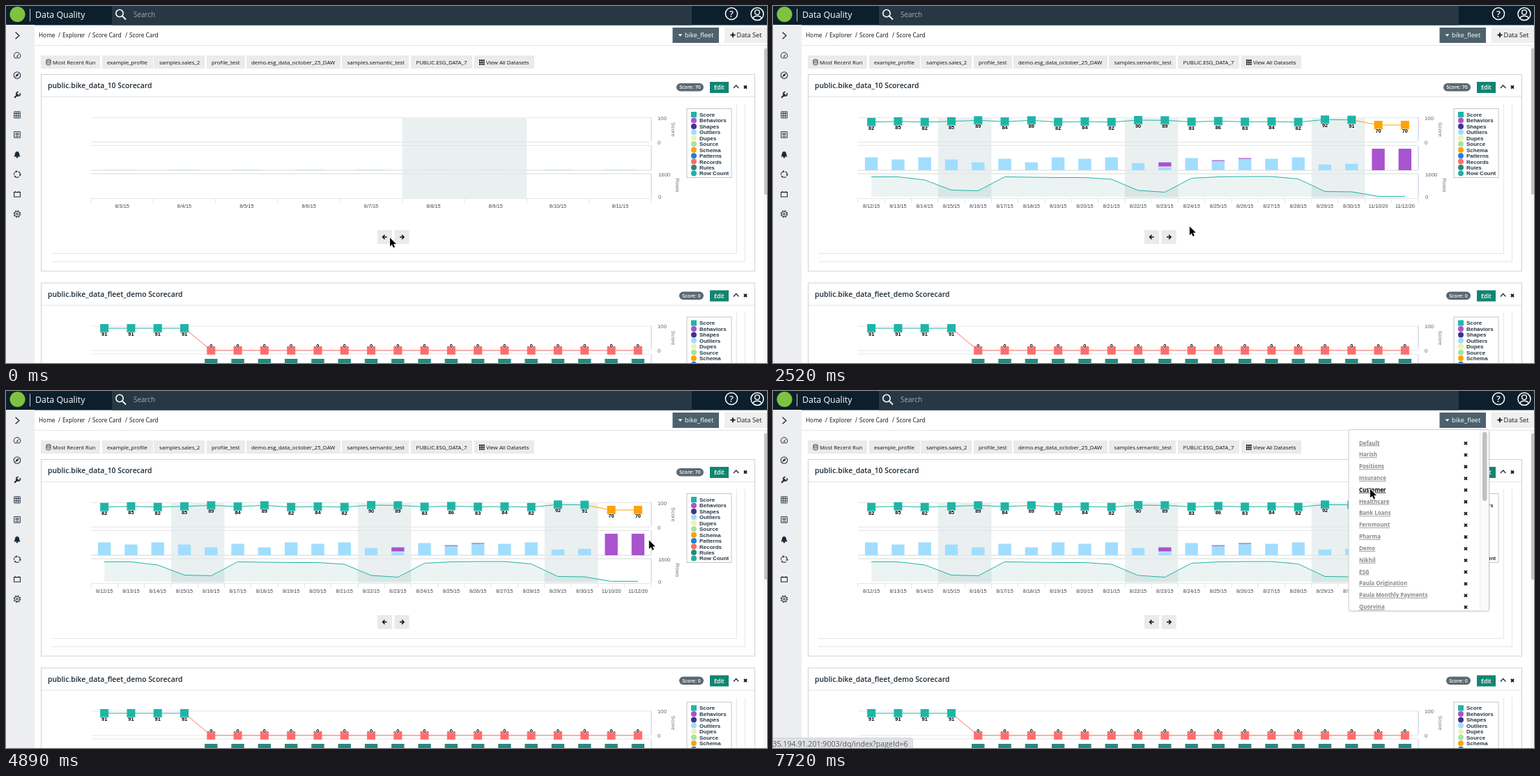
Recreate the animation shown at these times as an HTML page. Size 1092 px wide and 513 px high, loop 8000 ms.

```html
<!DOCTYPE html>
<html lang="en">
<head>
<meta charset="utf-8">
<title>Scorecards</title>
<style>
  html, body { margin: 0; width: 100%; height: 100%; overflow: hidden; background: #fff; }
  svg { display: block; width: 100%; height: 100%; }
  text { font-family: "Open Sans", "Noto Sans", sans-serif; white-space: pre; }
  .chart { font-family: "Liberation Sans", Arial, sans-serif; }
  .value { font-weight: bold; paint-order: stroke; stroke: #fff; stroke-width: 1.4px; stroke-linejoin: round; }
</style>
</head>
<body>
<svg id="stage" viewBox="0 0 1092 513">
  <g id="page"></g>
  <g id="live"></g>
</svg>
<script>
const LOOP = 8000, STEP = 147.85, LAST = 52;
const LEFT = 122, WIDTH = 804;
const TEAL = '#1fb5a6', SKY = '#a1ddff', PURPLE = '#a953cf', ORANGE = '#ffa205', RED = '#ff6d6b', RULES = '#26897f';
const NAVY = '#16293a';

// --- drawing helpers ---
const rect = (x, y, w, h, fill, more = '') =>
  `<rect x="${x}" y="${y}" width="${w}" height="${h}" fill="${fill}" ${more}/>`;
const line = (x1, y1, x2, y2, color, w = 1) =>
  `<path d="M${x1} ${y1}L${x2} ${y2}" stroke="${color}" stroke-width="${w}"/>`;
const path = (d, color, w = 1.2, fill = 'none', more = '') =>
  `<path d="${d}" stroke="${color}" stroke-width="${w}" fill="${fill}" ${more}/>`;
const circle = (x, y, r, fill, more = '') =>
  `<circle cx="${x}" cy="${y}" r="${r}" fill="${fill}" ${more}/>`;
const text = (x, y, str, size, fill = '#1b1b1b', more = '') =>
  `<text x="${x}" y="${y}" font-size="${size}" fill="${fill}" ${more}>${str}</text>`;
const at = (x, y, body, scale = 1) => `<g transform="translate(${x} ${y}) scale(${scale})">${body}</g>`;
const cross = (x, y) => path(`M${x - 2} ${y - 2}l4 4m0 -4l-4 4`, '#111', 1.8);
const clamp = v => Math.max(0, Math.min(1, v));
const MID = 'text-anchor="middle"', SEMI = 'font-weight="600"', BOLD = 'font-weight="bold"';

// --- chart data ---
const pages = [
  { start: -87, scale: 1.78, weekends: [5],
    scores: [89, 84, 84, 84, 84, 93, 92.7, 84, 84],
    rows: [248, 246.5, 247, 248, 250, 265, 266.5, 246.5, 245.5],
    extra: { 6: .8 },
    date: i => `8/${3 + i}/15` },
  { start: 1337, scale: 1.03, weekends: [3, 10, 17],
    scores: [82, 85, 82, 85, 89, 84, 89, 82, 84, 82, 90, 89, 83, 86, 83, 84, 82, 92, 91, 70, 70],
    rows: [245.5, 245.5, 250, 264.5, 265.5, 245.5, 246, 246.5, 246.5, 249, 265, 267.5, 247.5, 245.5,
      245, 245, 248.5, 266.5, 267, 273.5, 273.5],
    extra: { 11: 6.5, 13: 1.2, 14: 1.2, 19: 32, 20: 32 },
    date: i => i < 19 ? `8/${12 + i}/15` : `11/${i * 2 - 28}/20` }
];
const tone = s => s > 75 ? TEAL : s > 50 ? ORANGE : RED;
const points = (scores, dy = 0) => scores.map((s, i) => ({
  x: LEFT + (i + .5) * WIDTH / scores.length, y: 195.5 + dy - .35 * s, s, color: tone(s)
}));

const scoreLine = (pts, w) => pts.slice(1).map((p, i) =>
  line(pts[i].x, pts[i].y, p.x, p.y, p.color, w)).join('');
const markers = pts => pts.map(p => rect(p.x - 6, p.y - 6, 12, 12, p.color)).join('');
const values = pts => pts.map(p =>
  text(p.x, p.y + (p.s ? 11.1 : -3.7), Math.round(p.s), 7.4, '#000', `class="chart value" ${MID}`)).join('');

// --- still parts ---
function sidebar() {
  const icons = [
    path('M-2.5 -5L3 0L-2.5 5', NAVY, 1.4),
    path('M-3.6 4A5 5 0 1 1 3.6 4ZM0 1.5L2.6 -2', NAVY, 1) + circle(0, 1.5, 1, NAVY),
    circle(0, 0, 5, 'none', `stroke="${NAVY}" stroke-width="1.1"`) + path('M2.6 -2.6L1 1L-2.6 2.6L-1 -1Z', NAVY, .4, NAVY),
    path('M-4 4L1.5 -1.5', NAVY, 2.2) + path('M4.4 -2.8A3 3 0 1 1 1.8 -4.6', NAVY, 1.7),
    path('M-4.5 -4.8h9v9.6h-9zM-4.5 -2h9M-4.5 1.5h9M-1.5 -4.5v9M1.5 -4.5v9', NAVY, .9),
    path('M-4.5 -4.5h9v9h-9zM-2.5 2.4h5M-2 0v-2h4v2z', NAVY, 1),
    path('M-4.5 3C-2.5 1 -4 -4.5 0 -4.5S2.5 1 4.5 3Z', NAVY, .4, NAVY) + circle(0, 4, 1.3, NAVY),
    path('M-4.6 1A4.6 4.6 0 0 1 -1 -4.4M1.5 -4.2A4.6 4.6 0 0 1 4.5 1M3 3.5A4.6 4.6 0 0 1 -3 3.5', NAVY, 1.1) +
      path('M-2 -6l2.5 1.5l-2 2zM6 0l-1.5 2.6l-1.8 -2zM-4 1.8l.3 3l2 -1.6z', NAVY, .2, NAVY),
    path('M-4.7 -3h9.4v7h-9.4zM-4.7 -2.8h9.4M-2.5 -4.6v1.5M2.5 -4.6v1.5', NAVY, 1.1),
    circle(0, 0, 4, 'none', `stroke="${NAVY}" stroke-width="1"`) + circle(0, 0, 1.5, 'none', `stroke="${NAVY}"`) +
      circle(0, 0, 5, 'none', `stroke="${NAVY}" stroke-width="1.2" stroke-dasharray="1.9 2.03"`)
  ];
  return rect(0, 27, 41, 486, '#edeeef') + icons.map((icon, i) => at(16, 42.4 + 28.5 * i, icon, .95)).join('');
}

function header() {
  return rect(0, 0, 1092, 27.5, '#0c1f2c') + rect(152, 0, 832, 27.5, '#273844') +
    circle(16.5, 12, 11, '#7fc241') + line(34.5, 4, 34.5, 22, '#c9d0d5') +
    text(42, 17, 'Data Quality', 12.4, '#fff') +
    circle(163, 10.5, 5.2, 'none', 'stroke="#fff" stroke-width="1.6"') + line(167, 14.5, 172, 19.5, '#fff', 1.8) +
    text(183, 16, 'Search', 9.9, '#a3adb4') +
    circle(1041, 11, 8.6, 'none', 'stroke="#fff" stroke-width="1.5"') + text(1041, 15.6, '?', 13, '#fff', `${MID} ${SEMI}`) +
    circle(1078, 11.5, 9, 'none', 'stroke="#fff" stroke-width="1.5"') +
    circle(1078, 9, 3.4, 'none', 'stroke="#fff" stroke-width="1.4"') +
    path('M1072 17.5C1073.5 13.2 1082.5 13.2 1084 17.5', '#fff', 1.4);
}

function toolbar() {
  const crumbs = [[47, 'Home'], [75, '/'], [81, 'Explorer'], [118, '/'], [124, 'Score Card'], [171, '/'], [177, 'Score Card']];
  const tags = [[50, 85, 'Most Recent Run', 67], [138, 73, 'example_profile', 145], [212, 73, 'samples.sales_2', 220],
    [288, 55, 'profile_test', 295], [345, 135, 'demo.esg_data_october_25_DAW', 352],
    [482, 96, 'samples.semantic_test', 489.5], [581, 88, 'PUBLIC.ESG_DATA_7', 588.5], [672, 86, 'View All Datasets', 689]];
  let grid = '';
  for (let i = 0; i < 9; i++) grid += rect(679 + i % 3 * 2.8, 77 + Math.floor(i / 3) * 2.8, 2.1, 2.1, '#111');
  return line(41, 56.5, 1092, 56.5, '#e3e4e5') +
    crumbs.map(([x, s]) => text(x, 45, s, 8.3, '#111')).join('') +
    rect(956.5, 31, 66.5, 22, '#4d616d') + path('M964.5 40.5h6l-3 3.2z', 'none', 0, '#fff') +
    text(974, 45, 'bike_fleet', 9.3, '#fff') +
    rect(1031, 31, 61, 22, '#eeefef') + path('M1039.5 41.7h7M1043 38.2v7', '#111', 1.7) + text(1048.5, 45, 'Data Set', 9.2) +
    tags.map(([x, w, s, tx]) => rect(x, 71, w, 19, '#eaebec') + text(tx, 83.7, s, 7.8, '#111')).join('') +
    path('M58 78v5.5c0 1.6 6 1.6 6 0v-5.5c0 -1.6 -6 -1.6 -6 0c0 1.6 6 1.6 6 0M58 80.7c0 1.6 6 1.6 6 0', '#333', .9) + grid +
    rect(1087, 57, 5, 456, '#f7f7f7') + rect(1088, 61, 5, 210, '#c2c3c4', 'rx="2"');
}

function legend() {
  const items = [['Score', TEAL], ['Behaviors', PURPLE], ['Shapes', '#44328d'], ['Outliers', SKY], ['Dupes', '#f3f0b0'],
    ['Source', '#a3e5a5'], ['Schema', ORANGE], ['Patterns', '#1a83d8'], ['Records', RED], ['Rules', RULES], ['Row Count', '#1fb29f']];
  return rect(977, 147.5, 64, 99, '#fff', 'stroke="#c3c5c8" stroke-width="1"') + items.map(([name, color], i) => {
    const y = 156 + 8.45 * i;
    return (i ? circle(987, y, 4, color) : rect(983, y - 4, 8, 8, color)) +
      text(995, y + 2.9, name, 8, '#263746', `class="chart" ${BOLD}`);
  }).join('');
}

function card(title, score, badgeX) {
  const grid = [160.5, 195.5, 200.5, 236, 241, 276.5].map(y => line(LEFT, y, 926, y, '#e6e6e6')).join('');
  const axes = [160, 201, 241].map(y => line(926, y, 926, y + 34, '#ccd6eb', 1.3)).join('');
  const tick = (x, y, s) => text(x, y, s, 7.8, '#666', 'class="chart"');
  const side = (x, y, s) => `<g transform="translate(${x} ${y}) rotate(90)">${text(0, 0, s, 8, '#777', `class="chart" ${MID}`)}</g>`;
  return rect(50.5, 98.5, 1024, 282.5, '#fff', 'stroke="#cfd1d3"') + line(51, 130.5, 1074, 130.5, '#dfe1e2') +
    text(60, 118.2, title, 10.36, '#1c2933', SEMI) +
    rect(badgeX, 111, 1001 - badgeX, 11.5, '#5c6870', 'rx="5.7"') +
    text((badgeX + 1001) / 2, 119.4, score, 7.1, '#fff', `${MID} ${SEMI}`) +
    rect(1010, 109, 27, 16, '#128571') + text(1023.3, 120.1, 'Edit', 8, '#fff', `${MID} ${SEMI}`) +
    path('M1044 118l3.7 -4l3.7 4', '#222', 1.2) + cross(1061, 116.5) +
    path('M65 355.5H1048.5V141M65 367.5H1060.5V141', '#e5e6e7', 1) +
    grid + axes + tick(935, 163.8, '100') + tick(935, 198.8, '0') + tick(936, 245, '1600') + tick(936, 276.8, '0') +
    side(954.5, 177.5, 'Score') + side(960.5, 257.5, 'Rows') + legend();
}

function still() {
  const fleet = points(Array.from({ length: 21 }, (_, i) => i < 4 ? 91 : 0), 299.4);
  const arrow = (x, dir) => rect(x - 10.5, 322, 21, 20, '#e9eaeb') +
    path(`M${x - 3 * dir} 332H${x + 2.6 * dir}M${x} 329l${3 * dir} 3l${-3 * dir} 3`, '#111', 1.5);
  return rect(41, 27, 1051, 486, '#fff') + header() + sidebar() + toolbar() +
    card('public.bike_data_10 Scorecard', 'Score: 70', 962) + arrow(543.5, -1) + arrow(568, 1) +
    at(0, 299.5, card('public.bike_data_fleet_demo Scorecard', 'Score: 0', 966)) +
    scoreLine(fleet, 1) + markers(fleet) + values(fleet) +
    fleet.slice(4).map(p => rect(p.x - 9.2, 507, 18.4, 29, RULES)).join('');
}

// --- moving parts ---
const route = [[0, 551, 333], [450, 563, 331], [2300, 563, 331], [2380, 564, 329], [2520, 598, 317], [3100, 490, 235],
  [3400, 405, 178], [3550, 412, 175], [3700, 480, 185], [3850, 600, 205], [4000, 740, 230], [4150, 845, 252],
  [4300, 890, 254], [4740, 905, 250], [5000, 935, 190], [5500, 961, 72], [5780, 964, 48], [6240, 964, 48],
  [6500, 950, 62], [6900, 900, 94], [7200, 870, 124], [7415, 857, 141], [LOOP, 857, 141]];
function pointer(t) {
  const i = Math.max(1, route.findIndex(r => r[0] >= t));
  const [t0, x0, y0] = route[i - 1], [t1, x1, y1] = route[i];
  const f = clamp((t - t0) / (t1 - t0));
  return [x0 + (x1 - x0) * f, y0 + (y1 - y0) * f];
}
const nearest = t => Math.max(0, Math.min(20, Math.floor((pointer(t)[0] - LEFT) / WIDTH * 21)));

function chart(t) {
  const page = pages[t < 1300 ? 0 : 1];
  const { scores, rows, scale, extra } = page;
  const grow = (1 - Math.cos(Math.PI * clamp((t - page.start) / 1000))) / 2;
  const gap = WIDTH / scores.length, bar = gap * .48;
  const pts = points(scores);
  const hover = t > 3250 && t < 4880;
  const clip = (id, w) => `<clipPath id="${id}">${rect(LEFT, 140, Math.max(0, w), 140, '#000')}</clipPath>`;
  const rowPath = 'M' + rows.map((y, i) => `${pts[i].x} ${y}`).join('L');

  let out = clip('lineClip', WIDTH * grow) + clip('markClip', 869 * grow) + clip('areaClip', WIDTH * grow - (grow < 1 ? 6 : 0));
  out += page.weekends.map(i => rect(LEFT + i * gap, 160, 2 * gap, 116.5, '#eaf0f0')).join('');
  out += [195.5, 200.5, 236, 241].map(y => line(LEFT, y, 926, y, '#e2e5e5')).join('');
  out += pts.map((p, i) => {
    const total = (100 - p.s) * scale * grow;
    const top = Math.min(total, (extra[i] || 0) * grow);
    return rect(p.x - bar / 2, 236 - total + top, bar, total - top, SKY) +
      (top ? rect(p.x - bar / 2, 236 - total, bar, top, PURPLE) : '') +
      (top > 2 && total - top > 2 ? rect(p.x - bar / 2, 235.5 - total + top, bar, 1, '#fff') : '');
  }).join('');
  out += `<g clip-path="url(#areaClip)">${path(`${rowPath}L${pts.at(-1).x} 274L${pts[0].x} 274Z`, 'none', 0, RULES, 'fill-opacity=".09"')}${path(rowPath, TEAL, 1)}</g>`;
  out += `<g clip-path="url(#lineClip)">${scoreLine(pts, hover ? 2 : 1)}</g><g clip-path="url(#markClip)">${markers(pts)}</g>`;
  out += `<g opacity="${clamp((t - page.start - 1000) / 150)}">${values(pts)}</g>`;
  for (let i = 0; i <= scores.length; i++) out += line(LEFT + i * gap, 276, LEFT + i * gap, 283, '#e0e3e6');
  out += pts.map((p, i) => text(p.x, 289.6, page.date(i), 7.3, '#444', `class="chart" ${MID}`)).join('');
  return out + (hover ? tooltip(t, pts) : '');
}

function tooltip(t, pts) {
  const now = nearest(t), lag = nearest(t - 75), tail = Math.min(lag, nearest(t - 220));
  let out = '';
  for (let i = tail; i <= lag; i++) {
    const r = i === lag ? 7 : 6.3;
    out += rect(pts[i].x - r, pts[i].y - r, 2 * r, 2 * r, pts[i].color,
      `stroke="#123a38" stroke-opacity="${i === lag ? 1 : .7}" stroke-width="1"`);
  }
  const x = pts[lag].x - 43, y = pts[now].y + 10.9;
  const day = now < 19 ? `2015-08-${12 + now}` : `2020-11-${now * 2 - 28}`;
  return out + rect(x, y, 90, 28.5, '#0d1112', `rx="1.5" fill-opacity=".93" stroke="${pts[now].color}"`) +
    text(x + 5, y + 12.5, `${day} 00:00:00.0`, 7.7, '#fff', `class="chart" ${BOLD}`) +
    text(x + 5, y + 21.8, `Score: ${pts[now].s}`, 7.4, '#fff', 'class="chart"');
}

const choices = ['Default', 'Harish', 'Positions', 'Insurance', 'Customer', 'Healthcare', 'Bank Loans', 'Fernmount', 'Pharma',
  'Demo', 'Nikhil', 'ESG', 'Paula Origination', 'Paula Monthly Payments', 'Quorvina'];
function menu([px, py]) {
  return rect(828, 58, 201, 260, '#000', 'rx="3" opacity=".06"') +
    rect(826, 55.5, 201.5, 260.5, '#fff', 'rx="2" stroke="#c9cbcd"') +
    line(1014.5, 56, 1014.5, 315, '#e9e9e9') + rect(1015, 56, 12, 259.5, '#fafafa') + rect(1018, 59, 6.5, 99, '#c1c1c1', 'rx="3"') +
    choices.map((name, i) => {
      const y = 74.7 + 16.83 * i;
      const over = Math.abs(py - y) < 6 && px > 841 && px < 841 + name.length * 4.6;
      return text(841, y + 2.8, name, 7.9, over ? '#000' : '#8a8a8a', `${BOLD} text-decoration="underline"`) + cross(994, y + .4);
    }).join('');
}

const status = (page, w, opacity) => `<g opacity="${opacity}">` +
  rect(-4, 498.7, w + 4, 18, '#dfe1e4', 'rx="3" stroke="#c8cacd" stroke-width=".8"') +
  text(-.5, 511, `35.194.91.201:9003/dq/index?pageId=${page}`, 10.6, '#55595d') + '</g>';

function live(t) {
  const spot = pointer(t);
  let out = chart(t);
  if (t > 5920) out += menu(spot);
  if (t > 5700 && t < 6500) out += status('22#', 213, t < 5920 ? .65 : 1);
  if (t > 7650) out += status('6', 200.5, 1);
  return out + at(spot[0], spot[1],
    path('M0 0V12.4L2.9 9.8L4.8 14.2L7 13.2L5.1 9H9Z', '#fff', 1.6, '#000', 'paint-order="stroke" stroke-linejoin="round"'));
}

document.getElementById('page').innerHTML = still();
const layer = document.getElementById('live');
const begin = performance.now();
let shown = -1;
function tick() {
  const step = Math.min(LAST, Math.floor((performance.now() - begin) % LOOP / STEP));
  if (step !== shown) {
    shown = step;
    layer.innerHTML = live(step * 148.3);
  }
  requestAnimationFrame(tick);
}
tick();
</script>
</body>
</html>
```
